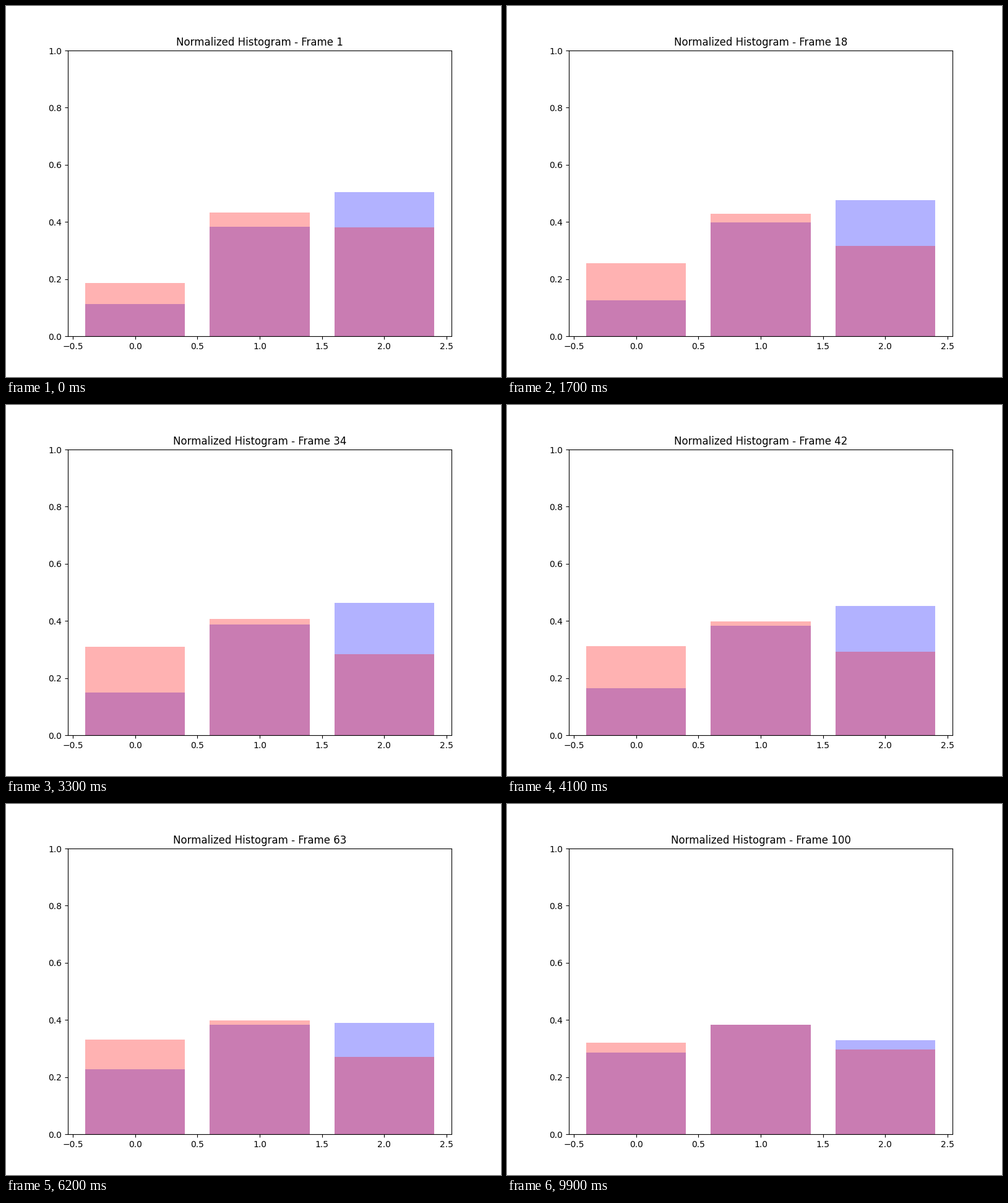
A matplotlib script that plays this animation: 800 px wide and 600 px high, repeating every 10000 ms.

```python
import numpy as np
import matplotlib.pyplot as plt
from matplotlib.animation import FuncAnimation

FRAMES = 100
SETTLED = 78  # the bars hold still from here on

rng = np.random.default_rng(4)
s = np.clip(np.arange(FRAMES) / SETTLED, 0, 1)


def drift(start, end, bow):
    """Bowed path from start to end, with jitter that fades at both ends."""
    arc = s * (1 - s)
    jitter = rng.normal(0, 0.012, FRAMES) * 4 * arc
    return start + (end - start) * s + bow * arc + jitter


def shares(first, third):
    """Heights that add up to one: the middle bar takes the remainder."""
    return np.column_stack([first, 1 - first - third, third])


blue = shares(drift(0.113, 0.2865, -0.2), drift(0.504, 0.330, 0.1))
red = shares(drift(0.186, 0.320, 0.22), drift(0.381, 0.297, -0.24))

fig, ax = plt.subplots(figsize=(8, 6), dpi=100)
x = np.arange(3)
blue_bars = ax.bar(x, blue[0], color="blue", alpha=0.3)
red_bars = ax.bar(x, red[0], color="red", alpha=0.3)
ax.set_ylim(0, 1)
title = ax.set_title("Normalized Histogram - Frame 1")


def update(i):
    for bars, heights in ((blue_bars, blue[i]), (red_bars, red[i])):
        for bar, height in zip(bars, heights):
            bar.set_height(height)
    title.set_text(f"Normalized Histogram - Frame {i + 1}")
    return [*blue_bars, *red_bars, title]


anim = FuncAnimation(fig, update, frames=FRAMES, interval=100,
                     repeat=True, repeat_delay=0)
plt.show()
```
